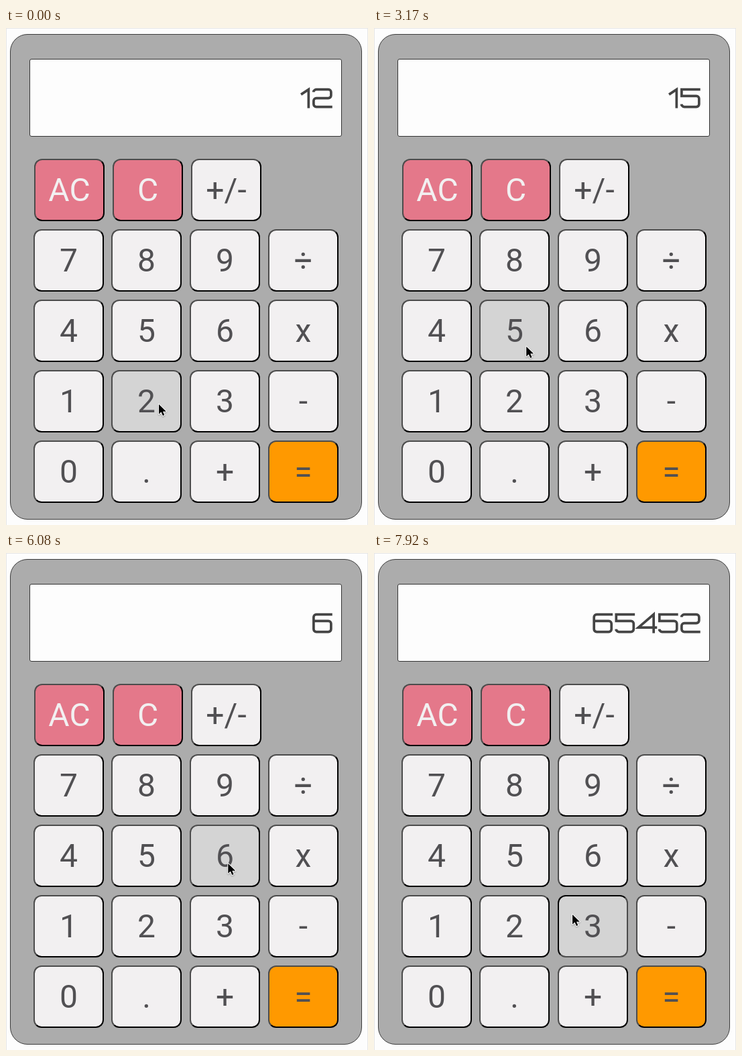
Animation, 540 px wide and 741 px high, one loop 8000 ms. Source, as an HTML page with a canvas:

```html
<!DOCTYPE html>
<html lang="en">
<head>
<meta charset="utf-8">
<title>Calculator</title>
<style>
  html, body { margin: 0; width: 100%; height: 100%; overflow: hidden; background: #fdfdfd; }
  #stage {
    position: relative; width: 540px; height: 741px; overflow: hidden;
    box-sizing: border-box; background: #fdfdfd;
  }
  #edge { position: absolute; inset: 0; border: 1px solid #e6e6e6; border-bottom: 0; }
  #body, #screen, .key { position: absolute; box-sizing: border-box; }
  #body {
    left: 6px; top: 9px; width: 525px; height: 724px;
    border: 1px solid #3c3c3c; border-radius: 26px; background: #acacac;
  }
  #screen {
    left: 35px; top: 46px; width: 466px; height: 116px;
    border: 1px solid #333; border-radius: 3px; background: #fdfdfd;
  }
  .key {
    width: 105px; height: 93px; border: 2px solid;
    border-color: #4c4c4c #000 #000 #4c4c4c; border-radius: 12px;
    background: #f2f0f1; color: #515053;
    font: 48px/89px Roboto, sans-serif; text-align: center; white-space: nowrap;
  }
  .clear { background: #e4788a; color: #f2f0f1; }
  .equals { background: #ff9900; }
  .hover { background: #d4d4d4; }
  .down { border-color: #000 #4c4c4c #4c4c4c #000; }
  canvas { position: absolute; left: 0; top: 0; }
</style>
</head>
<body>
<div id="stage">
  <div id="edge"></div>
  <div id="body"></div>
  <div id="screen"></div>
  <canvas id="overlay" width="540" height="741"></canvas>
</div>
<script>
const LOOP = 8000, STEP = 1000 / 12, PRESS = 115;
const stage = document.getElementById('stage');
const overlay = document.getElementById('overlay');
const ctx = overlay.getContext('2d');

const rows = ['AC C +/-', '7 8 9 ÷', '4 5 6 x', '1 2 3 -', '0 . + ='];
const keys = {};
rows.forEach((labels, row) => labels.split(' ').forEach((label, col) => {
  const x = row ? Math.floor(41 + col * 116.7) : 42 + col * 117, y = 195 + row * 105;
  const el = document.createElement('div');
  el.className = 'key' + (/C/.test(label) ? ' clear' : label === '=' ? ' equals' : '');
  el.textContent = label;
  el.style.left = x + 'px';
  el.style.top = y + 'px';
  stage.insertBefore(el, overlay);
  keys[label] = { el, x, y };
}));

// Where the pointer rests: key, arrival, departure, spot on the key.
// A key is released shortly before departure; without a stay it is only crossed.
const visits = [
  ['2', -200, 80, 71, 50], ['3', 750, 750, 50, 79], ['+', 1050, 1330, 63, 39],
  ['3', 1750, 1950], ['+', 2400, 2700, 63, 39], ['5', 3250, 3790],
  ['x', 4960, 5450, 39, 56], ['6', 5850, 6050], ['5', 6300, 6480],
  ['4', 6780, 6950, 71, 62], ['5', 7200, 7340], ['2', 7560, 7700],
  ['3', 7917, 8100, 22, 28]
].map(([label, arrive, leave, dx = 63, dy = 57]) => ({
  label, arrive, leave, release: leave - 80, click: leave > arrive,
  x: keys[label].x + dx, y: keys[label].y + dy
}));
const clicks = visits.filter(v => v.click);

const operations = { '+': (a, b) => a + b, '-': (a, b) => a - b, 'x': (a, b) => a * b, '÷': (a, b) => a / b };

// The calculator itself: replay every key released so far
function valueAt(t) {
  let shown = '1', total = 0, operator = '+', fresh = false;
  for (const { label, release } of clicks) {
    if (release > t) break;
    if (label in operations) {
      total = operations[operator](total, Number(shown));
      shown = String(total);
      operator = label;
      fresh = true;
    } else {
      shown = fresh ? label : shown + label;
      fresh = false;
    }
  }
  return shown;
}

function pointerAt(t) {
  const i = visits.findIndex(v => t <= v.leave);
  const to = visits[i], from = visits[i - 1] || to;
  if (t >= to.arrive) return [to.x, to.y];
  const u = (t - from.leave) / (to.arrive - from.leave);
  const ease = u * u * (3 - 2 * u);
  return [from.x + (to.x - from.x) * ease, from.y + (to.y - from.y) * ease];
}

// Digit strokes as column-row pairs on a 9 x 9 grid; a doubled point is a sharp corner
const glyphs = {
  0: '40 80 88 08 00 40',
  1: '02 30 30 38',
  2: '01 00 80 84 04 08 88',
  3: '01 00 80 84 84 24 84 88 08 07',
  4: '78 70 70 06 06 86',
  5: '80 00 00 03 03 83 88 08 07',
  6: '80 00 08 88 83 03'
};
const advance = d => d === '1' ? 17.3 : d === '4' ? 31.4 : 33.1;

function drawDigit(d, x, y) {
  const points = glyphs[d].split(' ').map(([c, r]) => [x + 2 + c * 3.25, y + 2 + r * 3.25]);
  ctx.beginPath();
  ctx.moveTo(...points[0]);
  points.slice(1).forEach((p, i) => ctx.arcTo(...p, ...(points[i + 2] || p), 4));
  ctx.lineTo(...points[points.length - 1]);
  ctx.stroke();
}

function drawNumber(text) {
  let x = 490;
  ctx.strokeStyle = '#444';
  ctx.lineWidth = 3.7;
  ctx.lineCap = 'square';
  for (const d of [...text].reverse()) drawDigit(d, x -= advance(d), 89.6);
}

const arrow = new Path2D('M0 0V17L4 13.3L6.8 19.6L9.6 18.4L6.9 12.3H12.5Z');
function drawPointer(x, y) {
  ctx.save();
  ctx.translate(x, y + 1);
  ctx.scale(.87, .87);
  ctx.lineJoin = 'round';
  ctx.lineWidth = 2.4;
  ctx.strokeStyle = '#fff';
  ctx.shadowColor = 'rgba(0,0,0,.3)';
  ctx.shadowBlur = 2;
  ctx.shadowOffsetY = 1;
  ctx.stroke(arrow);
  ctx.shadowColor = 'transparent';
  ctx.fillStyle = '#000';
  ctx.fill(arrow);
  ctx.restore();
}

function render(now) {
  const t = Math.floor((now % LOOP + 4) / STEP) * STEP % LOOP;
  const [px, py] = pointerAt(t);
  const pressed = clicks.some(v => t >= v.release - PRESS && t < v.release);
  for (const { el, x, y } of Object.values(keys)) {
    const over = px >= x && px < x + 105 && py >= y && py < y + 93;
    el.classList.toggle('hover', over);
    el.classList.toggle('down', over && pressed);
  }
  ctx.clearRect(0, 0, 540, 741);
  drawNumber(valueAt(t));
  drawPointer(px, py);
}

const start = performance.now();
function tick() {
  render(performance.now() - start);
  requestAnimationFrame(tick);
}
tick();
</script>
</body>
</html>
```
